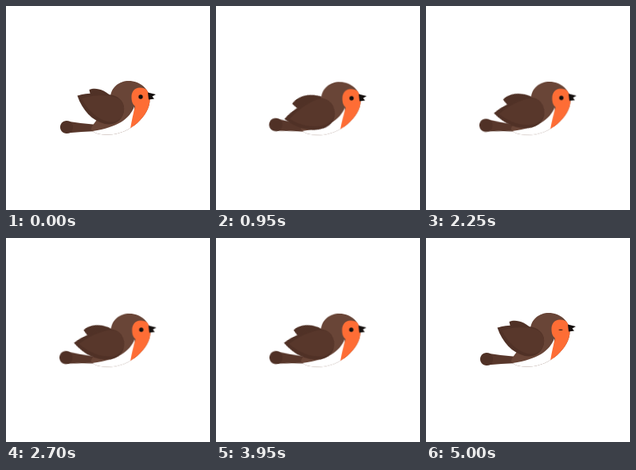
Animation, 256 px wide and 256 px high, one loop 5.05 s. Source, as an HTML page:

```html
<!DOCTYPE html>
<html lang="en">
<head>
<meta charset="utf-8">
<title>Flying robin</title>
<style>
  html, body { margin: 0; width: 100%; height: 100%; overflow: hidden; background: #fff; }
  svg { display: block; width: 100%; height: 100%; }

  .light { fill: #694537; }
  .brown { fill: #58372b; }
  .dark { fill: #503126; }
  .orange { fill: #fe6d35; }
  .white { fill: #fff; }
  .black { fill: #15100f; }

  /* Four wing beats of 1250 ms, then a 50 ms hold. */
  .beat { animation: beat 5050ms infinite; }
  .wing { transform-origin: 138px 131px; --low: rotate(-62deg) scale(1.05); }
  .far-wing { transform-origin: 130px 119px; --low: rotate(-66deg) scale(1.36); }
  .body { transform-origin: 115px 150px; --low: rotate(3.5deg); }
  .tail { transform-origin: 108px 152px; --low: rotate(10deg) scale(1.07); }
  .bill { transform-origin: 179px 114px; --low: rotate(-3deg); }

  @keyframes beat {
    0%, 24.752%, 49.505%, 74.257%, 99.01%, 100% {
      transform: rotate(0deg) scale(1);
      animation-timing-function: cubic-bezier(.3, .1, .55, 1);
    }
    12.376%, 37.129%, 61.881%, 86.634% {
      transform: var(--low);
      animation-timing-function: cubic-bezier(.42, 0, .65, .95);
    }
  }

  .eye {
    transform-origin: 169px 114.5px;
    animation: blink 5050ms step-end infinite;
  }
  @keyframes blink {
    0%, 33.4%, 67%, 100% { transform: none; }
    31.7%, 65.3%, 98.5% { transform: translateY(1px) scaleY(.22); }
  }
</style>
</head>
<body>
<svg viewBox="0 0 256 256" role="img" aria-label="A robin flapping its wings">
  <defs>
    <path id="torso" d="M131 114 C132 102 142 94 154 94 C168 94 180.5 104 180.5 118 C180.5 137 156 161.500 128 161.500 C118 161.500 110 160 107 155 C107 148 122 138 131 114Z"/>
    <clipPath id="inside"><use href="#torso"/></clipPath>
  </defs>

  <g class="beat tail">
    <path class="brown" d="M76 144.500 Q94 147.500 114 149 L114 157 Q94 157.500 76 159.500Z"/>
    <path class="dark" d="M76 144 C81 144 84 147 84 152 C84 157 81 160 76 160 C71 160 68 156 68 152 C68 148 71 144 76 144Z"/>
  </g>

  <path class="beat far-wing dark" d="M104.500 105 C112 102 124 104 134 116 L136 130 L118 130 C110 122 106 114 104.500 105Z"/>

  <g class="beat body">
    <use class="light" href="#torso"/>
    <g clip-path="url(#inside)">
      <path class="white" d="M161 126 C155 142 140 152 109 157 L112 166 L160 166Z"/>
      <path class="orange" d="M190 107 L179 107 C176 103.500 172 102.500 168 102.500 C161 102.500 157.500 108 157.500 114 C157.500 120 159 123 162 126 C160 134 158 142 156 154 L190 154Z"/>
    </g>
    <path class="beat bill black" d="M178 108.500 L188 111 L183.500 113.500 L186 116.500 L179 117.500Z"/>
    <circle class="eye black" cx="169" cy="114" r="2.7"/>
  </g>

  <g class="beat wing">
    <path class="dark" d="M89.500 112.500 C100 109 119 108 134 112 C145 115 150 124 147.500 134 C144.500 146 134 150 124 148 C108 144 96 131 89.500 112.500Z"/>
    <path class="brown" d="M95 116 C105 113 120 111 134 113.500 C145 116 150 124 147.500 134 C144.500 144 136 147 127 145 C113 141 102 130 95 116Z"/>
  </g>
</svg>
</body>
</html>
```
